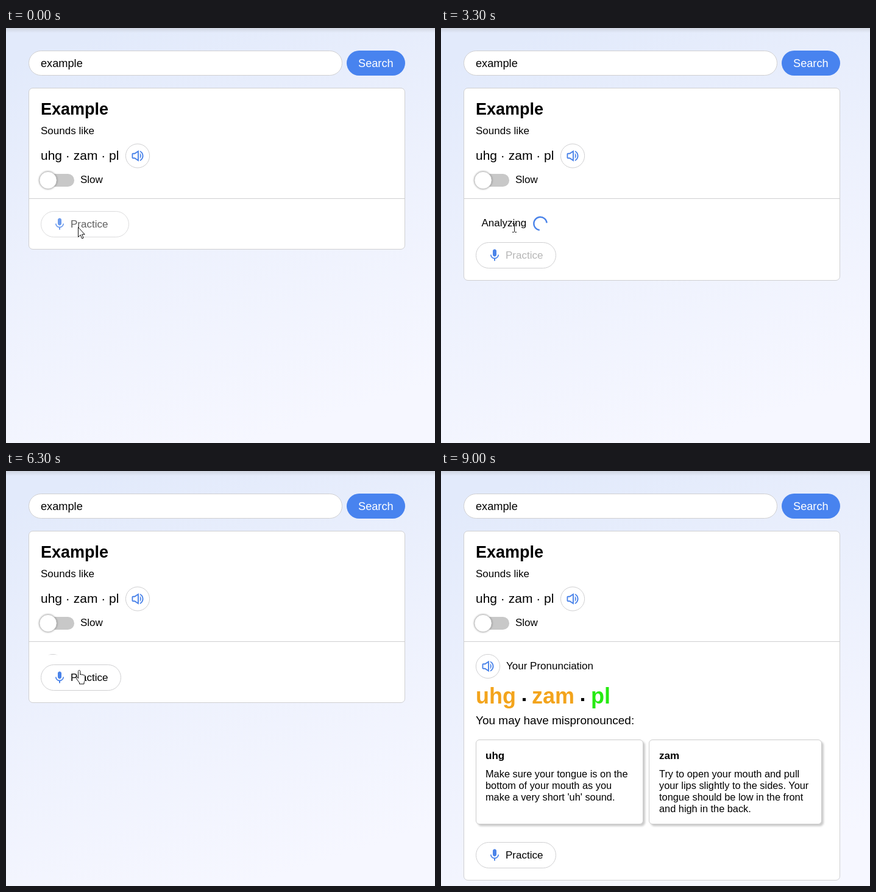
An HTML page that plays this animation: 704 by 680 pixels, repeating every 9100 ms.

```html
<!DOCTYPE html>
<html lang="en">
<head>
<meta charset="utf-8">
<title>Pronunciation practice</title>
<style>
  html, body { margin: 0; width: 100%; height: 100%; overflow: hidden; }
  svg { display: block; width: 704px; height: 680px; }
  text { font: 17px "Liberation Sans", Arial, sans-serif; fill: #000; white-space: pre; }
  .line { fill: #fff; stroke: #cfcfd1; }
  .tip { fill: #fff; stroke: #cbcbcb; filter: drop-shadow(3px 3px 1.5px #0003); }
  .blue { fill: #4a83e9; }
  .s16 { font-size: 16.35px; }
  .s18 { font-size: 18.2px; }
  .s19 { font-size: 19px; }
  .s21 { font-size: 21px; }
  .s27 { font-size: 27px; font-weight: bold; }
  .s36 { font-size: 36px; font-weight: bold; }
  .bold { font-weight: bold; }
  .warn { fill: #f3a41c; }
  .good { fill: #26ea12; }
  .cursor { fill: #fff; stroke: #111; stroke-linejoin: round; }
</style>
</head>
<body>
<svg viewBox="0 0 704 680">
  <defs>
    <linearGradient id="bg" gradientUnits="userSpaceOnUse" x1="180" y1="0" x2="400" y2="680">
      <stop offset="0" stop-color="#e2eafb"/>
      <stop offset=".5" stop-color="#edf1fd"/>
      <stop offset="1" stop-color="#f6f7ff"/>
    </linearGradient>
    <linearGradient id="shade" x2="0" y2="1">
      <stop offset="0" stop-color="#999" stop-opacity=".28"/>
      <stop offset="1" stop-color="#999" stop-opacity="0"/>
    </linearGradient>
    <clipPath id="fold"><rect id="foldBox" x="40" y="300" width="610" height="0"/></clipPath>
    <g id="speaker">
      <circle class="line" r="19.6"/>
      <path class="blue" transform="scale(.95) translate(-12 -12)" d="M16 21c3.527-1.547 6-4.909 6-9S19.527 4.547 16 3v2c2.387 1.386 4 4.047 4 7S18.387 17.614 16 19zM16 7v10c1.225-1.1 2-3.229 2-5s-.775-3.9-2-5zM4 17h2.7L14 21.868V2.132L6.7 7H4c-1.103 0-2 .897-2 2v6c0 1.103.897 2 2 2zm0-8h3.3L12 5.868v12.264L7.3 15H4z"/>
    </g>
  </defs>

  <rect width="704" height="680" fill="url(#bg)"/>
  <rect width="704" height="8" fill="url(#shade)"/>

  <rect class="line" x="37.5" y="37.5" width="514" height="40" rx="20"/>
  <text class="s18" x="57" y="64">example</text>
  <rect x="559" y="37" width="96" height="41" rx="20.5" fill="#4883ef"/>
  <text class="s18" x="578" y="64" style="fill:#fff">Search</text>

  <rect id="card" class="line" x="37.5" y="98.5" width="617" height="264" rx="6.5"/>
  <text class="s27" x="57" y="142">Example</text>
  <text x="57" y="174">Sounds like</text>
  <text class="s21" x="57" y="216">uhg · zam · pl</text>
  <use href="#speaker" x="216" y="209.5"/>
  <rect x="57" y="239" width="55" height="21" rx="10.5" fill="#c8c8c8"/>
  <circle cx="69" cy="249.5" r="14.2" fill="#fff" stroke="#c4c4c4" style="filter:drop-shadow(0 0 1.5px #0006)"/>
  <text x="122" y="254">Slow</text>
  <path d="M38 279.5H654" stroke="#cfcfd1"/>

  <g clip-path="url(#fold)">
    <g id="busy">
      <text x="66.5" y="325">Analyzing</text>
      <path id="ring" fill="none" stroke="#4a83e9" stroke-width="2.4"/>
    </g>
    <g id="result">
      <use href="#speaker" x="77" y="320"/>
      <text x="107" y="325">Your Pronunciation</text>
      <text class="s36 warn" x="57" y="381">uhg</text>
      <text class="s36 warn" x="149" y="381">zam</text>
      <text class="s36 good" x="246" y="381">pl</text>
      <path d="M134 372h5v5h-5zM230 372h5v5h-5z"/>
      <text class="s19" x="57" y="415">You may have mispronounced:</text>
      <rect class="tip" x="57.5" y="440.5" width="274" height="138" rx="5.5"/>
      <text class="bold" x="73" y="472">uhg</text>
      <text class="s16" x="73" y="502">Make sure your tongue is on the</text>
      <text class="s16" x="73" y="521">bottom of your mouth as you</text>
      <text class="s16" x="73" y="540">make a very short 'uh' sound.</text>
      <rect class="tip" x="341.5" y="440.5" width="283" height="138" rx="5.5"/>
      <text class="bold" x="358" y="472">zam</text>
      <text class="s16" x="358" y="502">Try to open your mouth and pull</text>
      <text class="s16" x="358" y="521">your lips slightly to the sides. Your</text>
      <text class="s16" x="358" y="540">tongue should be low in the front</text>
      <text class="s16" x="358" y="559">and high in the back.</text>
    </g>
  </g>

  <g id="button">
    <rect id="pill" class="line" x="57.5" y="300.5" width="131" height="42" rx="21"/>
    <path id="mic" class="blue" transform="translate(76 309.5)" d="M12 14c1.66 0 3-1.34 3-3V5c0-1.66-1.34-3-3-3S9 3.34 9 5v6c0 1.66 1.34 3 3 3zm5.3-3c0 3-2.54 5.1-5.3 5.1S6.7 14 6.7 11H5c0 3.41 2.72 6.23 6 6.72V21h2v-3.28c3.28-.48 6-3.3 6-6.72z"/>
    <text id="label" x="106" y="327">Practice</text>
  </g>

  <path id="arrow" class="cursor" d="M118.5 326.5v16l3.7-3.5 2.6 6 2.4-1-2.6-5.8h4.6z"/>
  <path id="beam" d="M117 320.5h2.5l1 1 1-1h2.5M120.500 321.500v12M117 334.500h2.500l1-1 1 1h2.500" fill="none" stroke="#111"/>
  <path id="hand" class="cursor" d="M118.500 340v-11.500c0-2.600 3.300-2.600 3.300 0v5.500c.4-1.400 2.600-1.200 2.800.3.500-1.200 2.500-.9 2.700.6.700-1 2.400-.5 2.400 1v5.600c0 2.500-1.500 3.500-1.700 5.500v2h-7.500v-2c-1.500-2.500-4.500-5.500-5.500-8-.6-1.700 1.300-2.400 2.300-1.200z"/>
</svg>
<script>
const LOOP = 9100, STEP = 100, GAP = 16;
const BUSY_H = 36, RESULT_H = 292;
const $ = id => document.getElementById(id);
const show = (id, on) => $(id).style.display = on ? "" : "none";

// Swing easing between two times
function swing(t, start, length) {
  const p = Math.min(1, Math.max(0, (t - start) / length));
  return 0.5 - Math.cos(Math.PI * p) / 2;
}

function ringPath(t) {
  const mid = Math.PI / 4 + (t - 3300) / 1000 * 2 * Math.PI;
  const half = 0.9, r = 10.7;
  const at = a => `${163 + r * Math.cos(a)} ${320.5 + r * Math.sin(a)}`;
  return `M${at(mid + half)}A${r} ${r} 0 1 1 ${at(mid - half)}`;
}

function draw(t) {
  const speaking = t < 2875;
  const done = t >= 6280;
  const busy = !speaking && !done;
  const ready = t >= 5800;

  const height = done
    ? RESULT_H * swing(t, 6280, 500)
    : BUSY_H * (swing(t, 2875, 470) - swing(t, 5800, 470));
  const offset = speaking ? 0 : Math.round(height + GAP);

  $("foldBox").setAttribute("height", speaking ? 0 : height);
  $("card").setAttribute("height", 264 + offset);
  $("button").setAttribute("transform", `translate(0 ${offset})`);
  show("busy", busy);
  show("result", done);
  $("ring").setAttribute("d", ringPath(t));

  const grow = speaking ? Math.min(1, 0.5 + t / 200) : Math.max(0, (3000 - t) / 200);
  $("pill").setAttribute("width", 131 + 26 * grow);
  $("pill").style.strokeOpacity = speaking ? 0.75 : 1;
  $("mic").style.opacity = speaking ? 0.8 : 1;
  $("label").textContent = speaking && t >= 100 ? "Speak Now" : "Practice";
  $("label").style.fill = t < 100 ? "#606060" : speaking ? "#444" : ready ? "#000" : "#b6b6b6";

  // The pointer rests over either the button or the text above it
  const onButton = offset < 27;
  show("arrow", onButton && !ready);
  show("hand", onButton && ready);
  show("beam", !onButton && t < 8300);
}

function tick() {
  const t = performance.now() % LOOP;
  draw(Math.floor(t / STEP) * STEP);
  requestAnimationFrame(tick);
}
tick();
</script>
</body>
</html>
```
